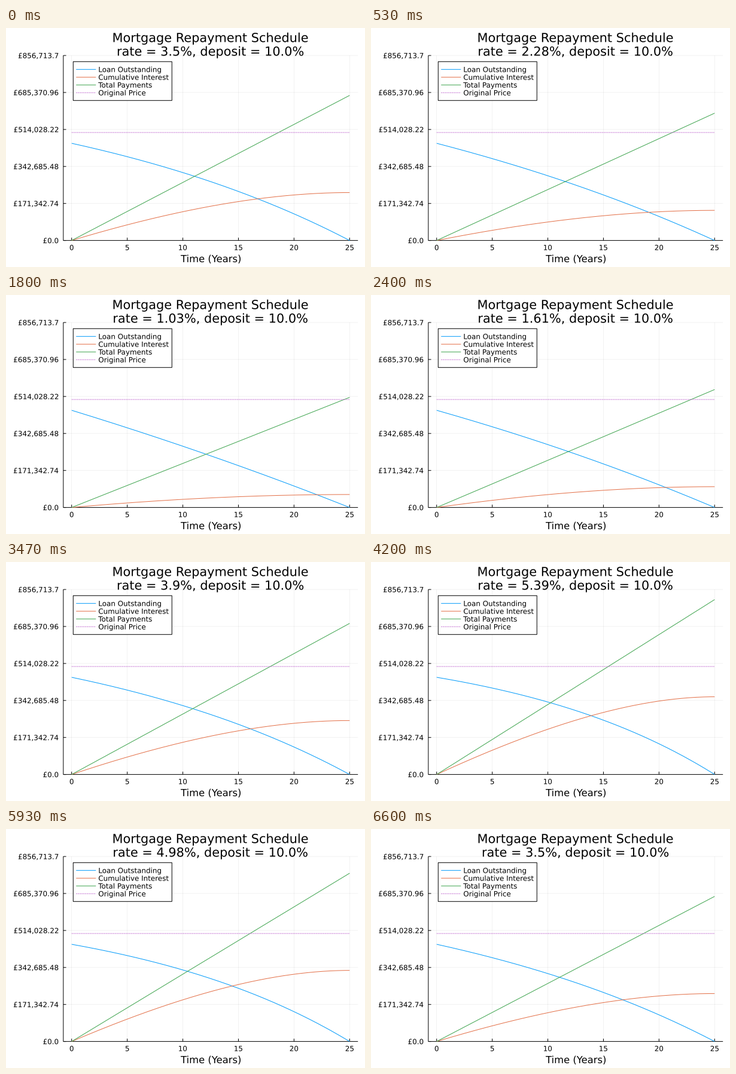
Recreate the animation shown at these times as a matplotlib script. Size 600x400 px, loop 6.67 s.

```python
import numpy as np
import matplotlib.pyplot as plt
from matplotlib.animation import FuncAnimation
from matplotlib.patches import PathPatch, Rectangle
from matplotlib.textpath import TextPath
from matplotlib.transforms import Affine2D

plt.rcParams.update({
    "font.family": "DejaVu Sans",
    "lines.solid_capstyle": "butt",
})

W, H, DPI = 600, 400, 100
PX = 72 / DPI  # points per pixel
LOOP = 6670
STEPS, TICKS = 100, 3  # each step of the rate lasts three ticks

PRICE, DEPOSIT, YEARS = 500_000, 0.10, 25
LOAN = PRICE * (1 - DEPOSIT)
MONTHS = np.arange(12 * YEARS + 1)
T = MONTHS / 12

LEFT, RIGHT, TOP, BOTTOM = 95.8, 588.2, 46.0, 355.6
SMALL, MEDIUM, LARGE = (1.49 * pt for pt in (8, 11, 14))
BLUE, ORANGE, GREEN, PURPLE = "#009AFA", "#E36F47", "#3EA44E", "#C371D2"
DOTS = (0, (2, 1))


def rate_at(step):
    """Annual rate in percent, one sine cycle over the loop."""
    return 3.5 - 2.5 * np.sin(2 * np.pi * step / (STEPS - 1))


def schedule(rate):
    """Outstanding loan, cumulative interest and total paid, by month."""
    g = (1 + rate / 100) ** (1 / 12)
    payment = LOAN * (g - 1) / (1 - g ** -MONTHS[-1])
    growth = g ** MONTHS
    owed = LOAN * growth - payment * (growth - 1) / (g - 1)
    paid = payment * MONTHS
    return owed, paid - (LOAN - owed), paid


Y_MAX = round(max(schedule(rate_at(i))[2][-1] for i in range(STEPS)), 1)

fig = plt.figure(figsize=(W / DPI, H / DPI), dpi=DPI, facecolor="white")

# Overlay in pixel coordinates, y pointing down
page = fig.add_axes([0, 0, 1, 1], zorder=2)
page.set(xlim=(0, W), ylim=(H, 0))
page.axis("off")
to_px = page.transData

plot = fig.add_axes([LEFT / W, 1 - BOTTOM / H,
                     (RIGHT - LEFT) / W, (BOTTOM - TOP) / H], zorder=1)
pad = 0.03 * YEARS
plot.set(xlim=(-pad, YEARS + pad), ylim=(0, Y_MAX))
plot.axis("off")


def text_path(x, y, s, size, align=0.5):
    """Outline of s with its baseline at y; align 0 left, 0.5 centre, 1 right."""
    path = TextPath((0, 0), s, size=size)
    box = path.get_extents()
    shift = align and box.x0 + align * box.width
    return path.transformed(Affine2D().translate(-shift, 0)
                            .scale(1, -1).translate(x, y))


def label(*args):
    return page.add_patch(PathPatch(text_path(*args), fc="black", lw=0,
                                    snap=False))


def curve(ax, x, y, color, width=1, **kw):
    return ax.plot(x, y, color=color, lw=width * PX, clip_on=False,
                   snap=False, **kw)[0]


def rule(x0, y0, x1, y1):
    curve(plot, [x0, x1], [y0, y1], "black", transform=to_px, zorder=2)


def grid(x0, y0, x1, y1):
    curve(plot, [x0, x1], [y0, y1], "black", 0.5, alpha=0.1,
          transform=to_px, zorder=1)


mid = (LEFT + RIGHT) / 2

for year in range(0, YEARS + 1, 5):
    x = LEFT + (RIGHT - LEFT) * (year + pad) / (YEARS + 2 * pad)
    grid(x, TOP, x, BOTTOM)
    rule(x, BOTTOM, x, BOTTOM - 4.7)
    label(x, 371.7, str(year), SMALL)

for k in range(6):
    y = BOTTOM + (TOP - BOTTOM) * k / 5
    grid(LEFT, y, RIGHT, y)
    rule(LEFT, y, LEFT + 4.7, y)
    label(87.3, y + 4.5, f"£{round(Y_MAX * k / 5, 2):,}", SMALL, 1)

rule(LEFT, BOTTOM, RIGHT, BOTTOM)
rule(LEFT, TOP, LEFT, BOTTOM)

label(mid, 391.9, "Time (Years)", MEDIUM)
label(mid, 23.5, "Mortgage Repayment Schedule", LARGE)
subtitle = label(mid, 46.3, " ", LARGE)

lines = [curve(plot, T, 0 * T, c, zorder=3) for c in (BLUE, ORANGE, GREEN)]
curve(plot, [0, YEARS], [PRICE, PRICE], PURPLE, ls=DOTS, zorder=3)

page.add_patch(Rectangle((112.3, 56.3), 165, 65, fc="white", ec="black",
                         lw=PX, snap=False))
legend = [("Loan Outstanding", BLUE, "-"), ("Cumulative Interest", ORANGE, "-"),
          ("Total Payments", GREEN, "-"), ("Original Price", PURPLE, DOTS)]
for k, (name, color, style) in enumerate(legend):
    y = 69.3 + 13 * k
    curve(page, [117.2, 150.3], [y, y], color, ls=style)
    label(154.3, y + 4.4, name, SMALL, 0)


def draw(tick):
    rate = rate_at((tick + 1) // TICKS % STEPS)
    for line, values in zip(lines, schedule(rate)):
        line.set_ydata(values)
    caption = f"rate = {round(float(rate), 2)}%, deposit = {100 * DEPOSIT}%"
    subtitle.set_path(text_path(mid, 46.3, caption, LARGE))
    return [*lines, subtitle]


anim = FuncAnimation(fig, draw, frames=STEPS * TICKS,
                     interval=LOOP / (STEPS * TICKS),
                     repeat=True, repeat_delay=0, blit=False)
plt.show()
```
